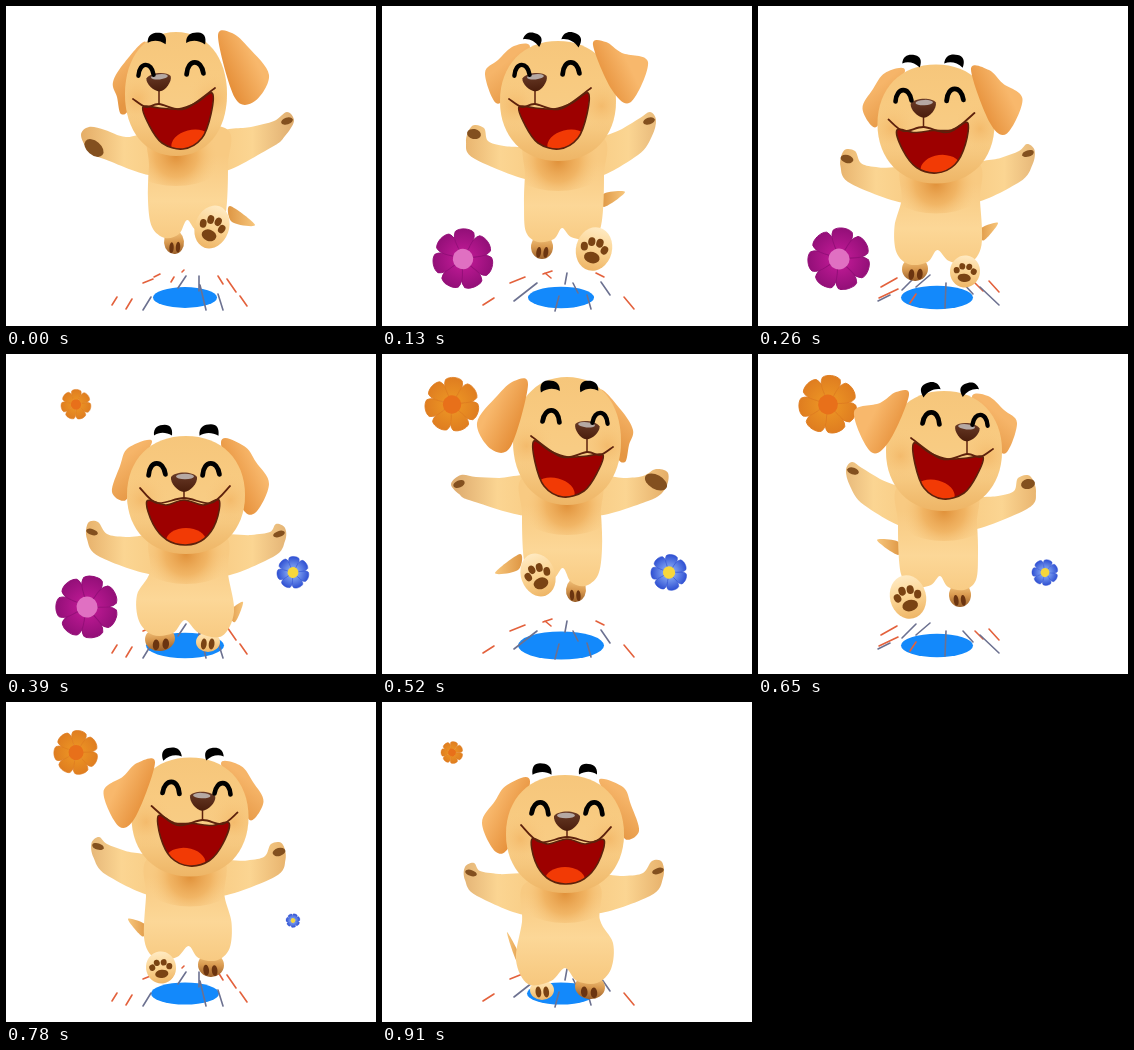
Animation of 370x320 px, one loop 1040 ms. Source, as an HTML page with a canvas:

```html
<!DOCTYPE html>
<html lang="en">
<head>
<meta charset="utf-8">
<title>Jumping puppy</title>
<style>
html, body { margin: 0; width: 100%; height: 100%; overflow: hidden; background: #fff; }
canvas { display: block; }
</style>
</head>
<body>
<canvas id="stage" width="370" height="320"></canvas>
<script>
const ctx = document.getElementById('stage').getContext('2d');
const STEP = 130, AXIS = 362;

// Poses: point lists are flat x,y pairs; look = nose x, nose y, turn of the head, brow tilt.
const high = {
  head: [170, 88, 51, 62], look: [153, 76, 1, .08],
  earL: [140, 37, 119, 56, 107, 76, 111, 91, 115, 108, 125, 98],
  earR: [212, 31, 226, 27, 243, 42, 263, 69, 249, 95, 229, 92],
  armL: [152, 128, 120, 131, 99, 124, 83, 121, 75, 129, 83, 145, 98, 153, 152, 169],
  armR: [213, 128, 245, 121, 268, 115, 281, 106, 288, 115, 279, 130, 266, 141, 213, 166],
  body: [147, 122, 143, 160, 142, 195, 146, 221, 159, 232, 173, 228, 181, 214, 190, 224, 206, 225, 219, 212, 222, 160, 219, 122],
  tail: [224, 200, 249, 219, 226, 216], rear: [168, 236, 10, 12, -.1], front: [206, 221, 17, 22, .35],
  pads: [88, 142, 11, 7, .7, 281, 115, 6, 3.5, -.3]
};
const fall = {
  head: [176, 95, 58, 60], look: [153, 76, 1, .45],
  earL: [148, 42, 132, 40, 116, 54, 103, 67, 114, 97, 128, 84],
  earR: [211, 39, 224, 36, 240, 47, 266, 56, 249, 96, 230, 84],
  armL: [152, 145, 122, 140, 106, 135, 102, 122, 90, 120, 84, 136, 93, 153, 152, 174],
  armR: [213, 138, 240, 123, 258, 112, 268, 106, 274, 114, 270, 130, 256, 149, 213, 171],
  body: [147, 130, 143, 170, 142, 200, 144, 226, 156, 236, 172, 233, 180, 222, 189, 231, 206, 233, 219, 220, 222, 170, 219, 130],
  tail: [221, 188, 243, 186, 222, 201], rear: [160, 241, 11, 12, 0], front: [212, 243, 18, 22, .25],
  pads: [92, 128, 7, 5, .2, 267, 115, 6, 3.5, -.3]
};
const land = {
  head: [180, 141, 59, 59], look: [178, 128, 0, 0],
  earL: [146, 87, 122, 94, 114, 112, 106, 138, 120, 146, 128, 120],
  earR: [215, 88, 238, 92, 250, 108, 263, 130, 249, 159, 234, 150],
  armL: [152, 184, 120, 183, 101, 180, 92, 168, 82, 169, 81, 185, 94, 203, 152, 220],
  armR: [213, 184, 245, 181, 264, 178, 270, 170, 279, 174, 279, 187, 267, 203, 213, 222],
  body: [148, 180, 144, 218, 131, 241, 133, 267, 147, 281, 167, 279, 179, 266, 193, 279, 216, 282, 228, 258, 222, 220, 217, 180],
  tail: [223, 258, 237, 248, 229, 268], rear: [154, 285, 15, 12, -.1], front: [202, 288, 12, 10, 0],
  pads: [86, 178, 6, 3, .3, 273, 180, 6, 3, -.3]
};
const highFlat = {
  ...high, head: [173, 87, 54, 64],
  armL: [152, 124, 120, 124, 101, 122, 88, 115, 76, 119, 79, 135, 96, 147, 152, 161],
  armR: [213, 124, 245, 124, 268, 123, 283, 121, 293, 130, 285, 140, 272, 147, 213, 161],
  pads: [88, 128, 12, 7, -.5, 285, 130, 6, 3.5, .4]
};
const mix = (a, b) => Object.fromEntries(
  Object.keys(a).map(k => [k, a[k].map((v, i) => (v + b[k][i]) / 2)]));
const down = mix(fall, land);
const landTail = { ...land, tail: [223, 256, 237, 230, 228, 258] };

// pose, mirrored, head shift x, upper body shift y, mat radius, flower radii (purple, orange, blue)
const scenes = [
  [high, 0, 0, 0, 32, 0, 0, 0],
  [fall, 0, 0, 0, 33, 30, 0, 0],
  [down, 0, 0, 0, 36, 31, 0, 0],
  [land, 0, 0, 0, 39, 31, 15, 16],
  [highFlat, 1, 4, 0, 43, 0, 27, 18],
  [fall, 1, 0, 2, 36, 0, 29, 13],
  [down, 1, 0, -3, 34, 0, 22, 7],
  [landTail, 1, -1, -9, 34, 0, 11, 0]
];

// Face features relative to the nose, for a turned and a frontal head.
const turned = {
  eyes: [-13, -12, 36, -14], brows: [-2, -43, 37, -43],
  smile: [-26, 17, -13, 25, 0, 22, 25, 27, 56, 6],
  mouth: [-16, 25, 0, 26, 19, 27, 37, 21, 53, 11, 52, 32, 43, 56, 24, 67, 3, 61, -10, 43],
  tongue: [32, 61]
};
const frontal = {
  eyes: [-27, -13, 27, -13], brows: [-21, -51, 25, -51],
  smile: [-44, 6, -27, 21, 0, 16, 27, 21, 46, 4],
  mouth: [-37, 19, -18, 23, 0, 18, 19, 23, 35, 18, 32, 40, 20, 57, 2, 63, -17, 58, -31, 42],
  tongue: [2, 59]
};
const quarter = mix(turned, frontal);

const redSparks = [
  [106, 299, 111, 291, 120, 303, 126, 293, 137, 277, 147, 273, 148, 271, 154, 268, 165, 276, 168, 271, 176, 266, 178, 264, 212, 270, 217, 278, 221, 273, 230, 286, 234, 290, 241, 300],
  [101, 299, 112, 292, 128, 277, 143, 271, 161, 268, 170, 265, 163, 267, 169, 272, 214, 267, 222, 271, 242, 291, 252, 303],
  [123, 281, 139, 272, 121, 292, 140, 283, 152, 297, 158, 288, 217, 277, 225, 285, 231, 275, 241, 286]
];
const graySparks = [
  [137, 304, 145, 291, 172, 282, 180, 270, 193, 270, 193, 285, 194, 279, 200, 304, 212, 288, 217, 304],
  [132, 295, 155, 277, 173, 305, 177, 290, 185, 267, 183, 278, 191, 277, 196, 287, 205, 289, 209, 303, 219, 276, 228, 289],
  [120, 295, 132, 289, 144, 284, 158, 270, 158, 281, 172, 269, 188, 277, 187, 302, 205, 277, 215, 288, 222, 281, 241, 299]
];

// Smooth curve through the points (Catmull-Rom).
function curve(pts, closed = true) {
  const path = new Path2D(), n = pts.length / 2;
  const at = i => {
    const k = closed ? (i + n) % n : Math.max(0, Math.min(n - 1, i));
    return [pts[2 * k], pts[2 * k + 1]];
  };
  path.moveTo(...at(0));
  for (let i = 0; i < (closed ? n : n - 1); i++) {
    const [a, b, c, d] = [at(i - 1), at(i), at(i + 1), at(i + 2)];
    path.bezierCurveTo(b[0] + (c[0] - a[0]) / 6, b[1] + (c[1] - a[1]) / 6,
      c[0] - (d[0] - b[0]) / 6, c[1] - (d[1] - b[1]) / 6, ...c);
  }
  return path;
}
function shade(gradient, colors) {
  colors.forEach((c, i) => gradient.addColorStop(i / (colors.length - 1), c));
  return gradient;
}
const linear = (x1, y1, x2, y2, ...colors) => shade(ctx.createLinearGradient(x1, y1, x2, y2), colors);
const radial = (x, y, r, ...colors) => shade(ctx.createRadialGradient(x, y, 0, x, y, r), colors);

function fill(path, color) {
  ctx.fillStyle = color;
  ctx.fill(path);
}
function stroke(path, color, width) {
  ctx.strokeStyle = color;
  ctx.lineWidth = width;
  ctx.stroke(path);
}
function oval(x, y, rx, ry, color, rot = 0) {
  const path = new Path2D();
  path.ellipse(x, y, rx, ry, rot, 0, 7);
  fill(path, color);
  return path;
}
function at(x, y, rot, scale, draw) {
  ctx.save();
  ctx.translate(x, y);
  ctx.rotate(rot);
  ctx.scale(scale, scale);
  draw();
  ctx.restore();
}

const petal = new Path2D('M0 0C.3-.08.6-.42.9-.31C1.04-.18 1.04.18.9.31C.6.42.3.08 0 0Z');
function flower(x, y, r, rot, inner, outer, center) {
  if (!r) return;
  at(x, y, rot, r, () => {
    for (let k = 0; k < 7; k++) {
      fill(petal, radial(0, 0, 1, inner, outer));
      stroke(petal, outer, .03);
      ctx.rotate(Math.PI * 2 / 7);
    }
    oval(0, 0, .34, .34, center);
  });
}

function sparks(pts, color) {
  const path = new Path2D();
  for (let i = 0; i < pts.length; i += 4) {
    path.moveTo(pts[i], pts[i + 1]);
    path.lineTo(pts[i + 2], pts[i + 3]);
  }
  stroke(path, color, 1.6);
}

function rearFoot([x, y, rx, ry, rot]) {
  at(x, y, rot, 1, () => {
    oval(0, 0, rx, ry, linear(0, -ry, 0, ry, '#f8cb84', '#d99a50', '#9a5f2a'));
    for (const k of [-.3, .35]) oval(k * rx, ry * .45, rx * .22, ry * .45, '#6b3410', .15);
  });
}
function frontFoot([x, y, rx, ry, rot], sole) {
  at(x, y, rot, 1, () => {
    oval(0, 0, rx, ry, linear(0, -ry, 0, ry, '#ffeac2', '#fbd493', '#eeb566'));
    if (sole) {
      oval(0, ry * .4, rx * .44, ry * .26, '#7a4313');
      [[-.56, -.02], [-.22, -.3], [.24, -.32], [.58, -.06]].forEach(([u, v]) =>
        oval(u * rx, v * ry, rx * .2, ry * .2, '#7a4313', u * .4));
    } else {
      for (const k of [-.35, .3]) oval(k * rx, ry * .2, rx * .24, ry * .55, '#7a4313', .1);
    }
  });
}

function headPath([x, y, rx, ry]) {
  const path = new Path2D(), k = .6;
  path.moveTo(x - rx, y);
  path.bezierCurveTo(x - rx, y - ry * k, x - rx * k, y - ry, x, y - ry);
  path.bezierCurveTo(x + rx * k, y - ry, x + rx, y - ry * k, x + rx, y);
  path.bezierCurveTo(x + rx, y + ry * k, x + rx * k, y + ry, x, y + ry);
  path.bezierCurveTo(x - rx * k, y + ry, x - rx, y + ry * k, x - rx, y);
  return path;
}

const eye = new Path2D('M-8 6C-7-9 6-9 8 5');
const brow = new Path2D('M-10 5C-11-4-5-7 2-7C8-7 11-3 10 5C3 1-4 1-10 5Z');
const nose = new Path2D('M-13-5C-9-11 9-11 13-5C14 1 6 10 0 10C-6 10-14 1-13-5Z');

function face([x, y, turn, tilt]) {
  const f = turn === 1 ? turned : turn ? quarter : frontal;
  at(x, y, 0, 1, () => {
    const mouth = curve(f.mouth);
    fill(mouth, '#9d0000');
    ctx.save();
    ctx.clip(mouth);
    oval(...f.tongue, 20, 13, '#f23a05', -.25 * turn);
    ctx.restore();
    stroke(mouth, '#5d210c', 1.6);
    stroke(curve(f.smile, false), '#5d210c', 1.8);
    stroke(new Path2D('M0 8V' + f.smile[5]), '#5d210c', 1.5);
    at(0, 0, -.1 * turn, 1 - .06 * turn, () => {
      fill(nose, linear(0, -10, 0, 10, '#6a3c28', '#4a1d0c'));
      oval(1, -5.5, 9, 2.8, '#b5a8a3');
    });
    for (const i of [0, 2]) {
      at(f.eyes[i], f.eyes[i + 1], 0, i ? 1.05 : 1.05 - .1 * turn, () => stroke(eye, '#000', 4.6));
      at(f.brows[i], f.brows[i + 1], tilt, i ? .95 : .9, () => fill(brow, '#000'));
    }
  });
}

function dog(p, dx, dy) {
  const [hx, hy, rx, ry] = p.head, sole = p.look[2] > .4;
  fill(curve(p.tail), linear(p.tail[0], 0, p.tail[2], 0, '#e09a48', '#f7c67c'));
  rearFoot(p.rear);
  if (!sole) frontFoot(p.front, false);

  ctx.save();
  ctx.translate(0, dy);
  fill(curve(p.armL), linear(76, 0, 160, 0, '#e5ae68', '#fbd592', '#f8cb83'));
  fill(curve(p.armR), linear(288, 0, 205, 0, '#dfad70', '#fbd592', '#f8cb83'));
  const [lx, ly, lrx, lry, lrot, ...padR] = p.pads;
  oval(lx, ly, lrx, lry, '#83501f', lrot);
  oval(...padR.slice(0, 4), '#83501f', padR[4]);
  ctx.restore();

  const body = curve(p.body), chin = hy + ry + dy;
  fill(body, linear(0, chin, 0, chin + 90, '#f8ca82', '#fcd797', '#f7c87f'));
  ctx.save();
  ctx.clip(body);
  oval(hx + dx, chin, 52, 30, radial(hx + dx, chin, 42, '#e0913a', 'rgba(238,172,88,.75)', 'rgba(248,202,130,0)'));
  ctx.restore();
  if (sole) frontFoot(p.front, true);

  ctx.translate(dx, dy);
  const [ax, ay] = p.earL, [bx, by] = p.earR;
  fill(curve(p.earL), linear(ax - 32, ay + 20, ax - 8, ay + 50, '#f6b569', '#e59643'));
  const head = headPath(p.head);
  const rightEar = () => fill(curve(p.earR), linear(bx + 4, by + 50, bx + 42, by + 32, '#e2872f', '#f8b86c'));
  if (!sole) rightEar();
  fill(head, linear(0, hy - ry, 0, hy + ry, '#f6c67b', '#f8ca80', '#f8cd86', '#eeb566'));
  ctx.save();
  ctx.clip(head);
  for (const side of [-1, 1]) {
    const x = hx + side * rx * .75, y = hy + 5;
    oval(x, y, 30, 30, radial(x, y, 28, 'rgba(240,172,88,.55)', 'rgba(248,202,130,0)'));
  }
  ctx.restore();
  if (sole) rightEar();
  face(p.look);
}

function draw(now) {
  const i = Math.floor(now / STEP) % scenes.length;
  const [pose, mirrored, dx, dy, mat, purple, orange, blue] = scenes[i];
  ctx.clearRect(0, 0, 370, 320);
  ctx.lineCap = 'round';
  ctx.lineJoin = 'round';
  oval(179, 291.5, mat, mat * .325, '#1389fb');
  sparks(redSparks[i % 3], '#e3613c');
  sparks(graySparks[i % 3], '#6c7190');
  flower(81, 253, purple, .2 + i * .08, '#c81c9b', '#930f78', '#e070c2');
  flower(70, 50.5, orange, .1 + i * .05, '#ef9a25', '#df7d20', '#e8701a');
  flower(287, 218.5, blue, i * .1, '#9fc3ff', '#2f50d2', '#f7d73c');
  ctx.save();
  if (mirrored) ctx.transform(-1, 0, 0, 1, AXIS, 0);
  dog(pose, dx, dy);
  ctx.restore();
}

const start = performance.now();
function loop() {
  draw(performance.now() - start);
  requestAnimationFrame(loop);
}
loop();
</script>
</body>
</html>
```
